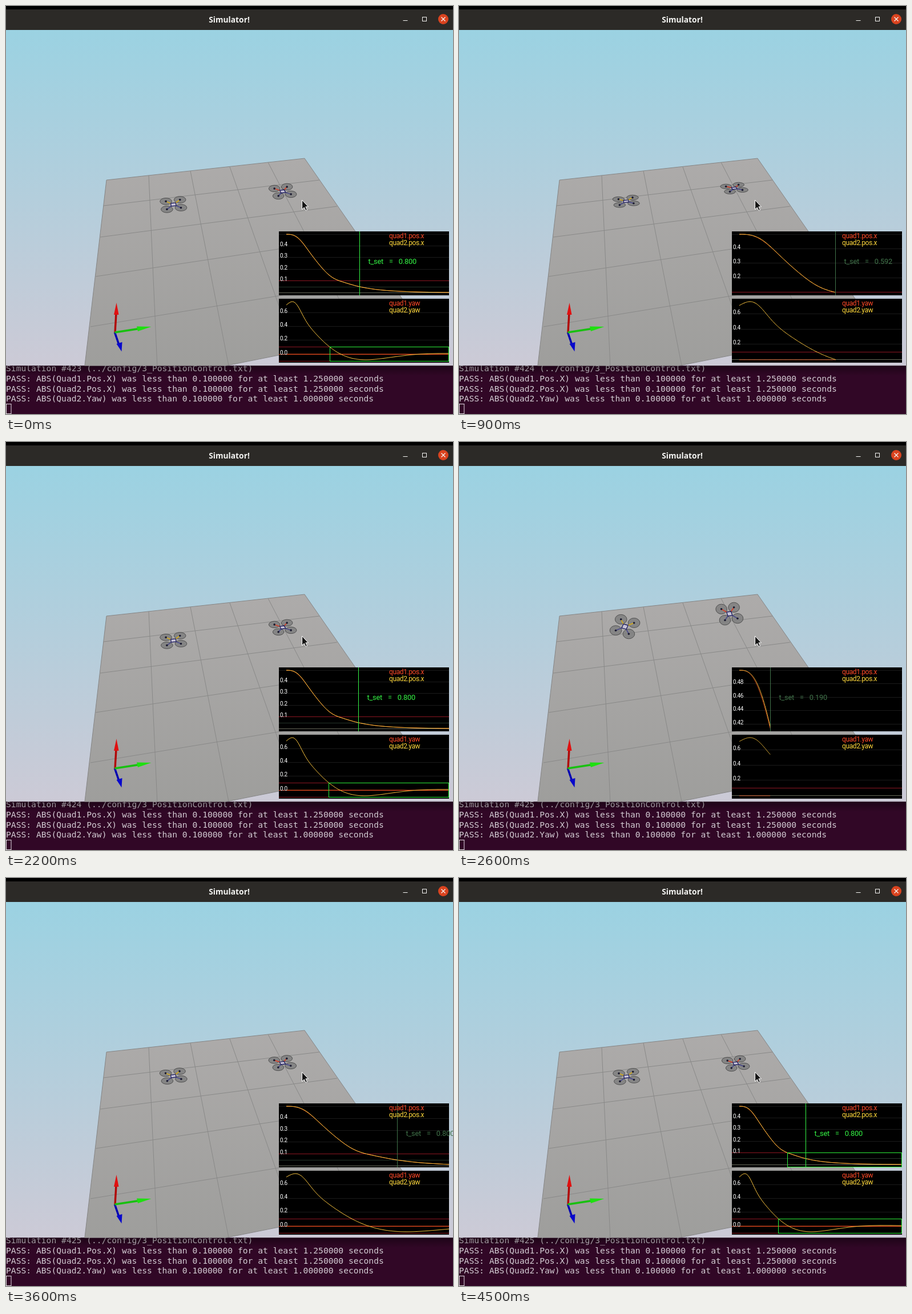
These frames come from a looping animation (783 px wide and 715 px high, 4600 ms). An HTML page:

```html
<!DOCTYPE html>
<html lang="en">
<head>
<meta charset="utf-8">
<title>Simulator</title>
<style>
  html, body { margin: 0; width: 100%; height: 100%; overflow: hidden; background: #000; }
  svg { display: block; }
  .title { font: bold 13.8px "Noto Sans", "Open Sans", sans-serif; fill: #f4f4f2; text-anchor: middle; }
  .term { font: 14.667px "DejaVu Sans Mono", monospace; fill: #d3ccd3; white-space: pre; }
  .plot { font-family: Roboto, "Liberation Sans", sans-serif; letter-spacing: -.4px; }
  .note { word-spacing: 7px; letter-spacing: -.2px; white-space: pre; }
  .crisp { shape-rendering: crispEdges; }
</style>
</head>
<body>
<svg width="783" height="715" viewBox="0 0 783 715">
  <defs>
    <linearGradient id="sky" x1="0" y1="0" x2="0" y2="1">
      <stop offset="0" stop-color="#9bd2e2"/><stop offset="1" stop-color="#cccad6"/>
    </linearGradient>
    <linearGradient id="floor" x1="0" y1="0" x2="0" y2="1">
      <stop offset="0" stop-color="#adabaa"/><stop offset="1" stop-color="#9c9c9a"/>
    </linearGradient>
    <linearGradient id="shade" x1="0" y1="0" x2="0" y2="1">
      <stop offset="0" stop-color="#000" stop-opacity=".4"/><stop offset="1" stop-color="#000" stop-opacity="0"/>
    </linearGradient>
    <clipPath id="view"><rect y="42" width="783" height="588.5"/></clipPath>
    <clipPath id="clipPos"><rect x="478" y="395" width="299" height="112"/></clipPath>
    <clipPath id="clipYaw"><rect x="478" y="513" width="299" height="112"/></clipPath>
  </defs>

  <rect width="783" height="715" fill="#000"/>
  <rect y="6" width="783" height="36" fill="#2c2a27"/>
  <text class="title" x="391" y="29">Simulator!</text>
  <g fill="none" stroke="#f4f4f2">
    <path d="M695.5 25.5h8"/>
    <rect x="729.5" y="19.5" width="7" height="7"/>
    <circle cx="766" cy="23" r="9" fill="#d9431f" stroke="none"/>
    <path d="M762.5 19.5l7 7m0-7l-7 7" stroke-width="1.3"/>
  </g>

  <rect y="630" width="783" height="85" fill="#310726"/>
  <g class="term">
    <text id="run" x="0" y="640"></text>
    <text x="0" y="658">PASS: ABS(Quad1.Pos.X) was less than 0.100000 for at least 1.250000 seconds</text>
    <text x="0" y="676">PASS: ABS(Quad2.Pos.X) was less than 0.100000 for at least 1.250000 seconds</text>
    <text x="0" y="693">PASS: ABS(Quad2.Yaw) was less than 0.100000 for at least 1.000000 seconds</text>
  </g>
  <rect x=".5" y="697.5" width="8.5" height="17" fill="none" stroke="#e6e0e6"/>
  <rect y="630" width="783" height="18" fill="url(#shade)"/>

  <g clip-path="url(#view)">
    <rect y="42" width="783" height="588.5" fill="url(#sky)"/>
    <path d="M176 305L523 267L728 562L132 681Z" fill="url(#floor)" stroke="#858585"/>
    <path d="M171 350L549 305M165 405L580 351M157 474L617 405M148 562L666 477
             M250 297L266 656M323 289L390 630M392 282L507 607M459 274L620 584" fill="none" stroke="#898988"/>
    <path d="M191 572L193 538" stroke="#b00808" stroke-width="3.500"/>
    <path d="M189 541L193.500 520L197.500 541Z" fill="#e01010"/>
    <path d="M190.500 572L198 594" stroke="#0000b0" stroke-width="3.500"/>
    <path d="M193.500 592L203.500 589L202.500 605.500Z" fill="#0808cc"/>
    <path d="M190.500 572L233 565.500" stroke="#18c010" stroke-width="3.500"/>
    <path d="M229 561.500L254.500 562L231 570Z" fill="#1ee010"/>
    <g id="drones"></g>
    <path d="M518.500 340V356.500L522.300 353L525 358.500L527.500 357.500L525 351.800H529.500Z" fill="#151515" stroke="#fff"/>
  </g>
  <g id="plots" class="plot"></g>
</svg>

<script>
const LOOP = 4600, STEP = 100;
const $ = id => document.getElementById(id);

// Each run starts its own clock; rate is in simulated seconds per ms
const RUNS = [
  { id: 423, from: 0, start: -1874, rate: .00095, slowing: 0 },
  { id: 424, from: 300, start: 266.5, rate: .000935, slowing: 0 },
  { id: 425, from: 2400, start: 2419, rate: .00106, slowing: 5.6e-8 }
];
const runAt = ms => RUNS.filter(run => run.from <= ms).pop() || RUNS[0];

function simTime({ start, rate, slowing }, ms) {
  const u = Math.max(0, ms - start);
  return u * (rate - slowing * u);
}

const bell = (t, middle, width) => Math.exp(-(((t - middle) / width) ** 2));

// Slow start, then exponential approach to zero
function pos1(t) {
  t = Math.max(0, t);
  return .5 * Math.exp(-3.2 * t ** 3 / (t * t + .08) - .12 * bell(t, .52, .12));
}
const pos2 = t => pos1(t) + .004 * bell(t, .15, .07);

// Damped swing with an early bump
const yaw2 = t => .76 * Math.exp(-2.37 * t) * Math.sin(3.6 * (.595 - t)) + .15 * bell(t, .09, .1);

// A quadrotor leans in proportion to its acceleration
function lean(t) {
  const h = .03, mid = t - h;
  return Math.atan((2 * pos1(mid) - pos1(mid - h) - pos1(mid + h)) / (h * h) / 10.5);
}

const line = (x1, y1, x2, y2, color, width = 1) =>
  `<path d="M${x1} ${y1}L${x2} ${y2}" stroke="${color}" stroke-width="${width}"/>`;
const label = (x, y, size, color, text) =>
  `<text x="${x}" y="${y}" font-size="${size}" fill="${color}">${text}</text>`;
const snap = v => Math.floor(v) + .5;

const LEFT = { start: [290, 318.5], end: [293.3, 348], ex: [1, 7], ey: [12.3, -1.5], radius: 10.3, lift: 8.8, arm: "#dcb010" };
const RIGHT = { start: [471.5, 296], end: [484.7, 325], ex: [3.5, 6.5], ey: [11, -1.5], radius: 9.8, lift: 9, arm: "#de3a20" };

function drone({ start, end, ex, ey, radius, lift, arm }, t, yaw) {
  const far = pos1(t) / .5, tilt = lean(t);
  const [cx, cy] = end.map((v, i) => v + (start[i] - v) * far);
  const fx = ex[0] * Math.cos(tilt), fy = ex[1] * Math.cos(tilt) + lift * Math.sin(tilt);
  const corners = r => [0, 1, 2, 3].map(k => {
    const angle = Math.PI / 4 - yaw * .85 + k * Math.PI / 2;
    const c = Math.cos(angle) * r, s = Math.sin(angle) * r;
    return [cx + fx * c + ey[0] * s, cy + fy * c + ey[1] * s];
  });
  const rotors = corners(Math.SQRT2), ry = radius * fy / ey[0];
  const discs = rotors.map(([x, y]) =>
    `<ellipse cx="${x}" cy="${y}" rx="${radius}" ry="${ry}" fill="#7f7f7f" fill-opacity=".85" stroke="#484848" stroke-width=".9"/>`);
  const arms = rotors.map(([x, y], k) => line(cx, cy, x, y, k == 1 || k == 2 ? arm : "#46468c", 1.5));
  const hubs = rotors.map(([x, y]) => `<circle cx="${x}" cy="${y}" r="1.8" fill="#1c1c30"/>`);
  return discs.join("") + arms.join("") + hubs.join("") +
    `<path d="M${corners(.5).join("L")}Z" fill="#c6c2d6" stroke="#1c1c5c" stroke-width="1.3"/>`;
}

const X0 = 491, X1 = 776, PANEL_H = 112;

// Smallest 1-2-5 step that gives at most eight ticks
function tickStep(range) {
  const unit = 10 ** Math.floor(Math.log10(range / 8));
  return unit * [1, 2, 5, 10].find(k => range / (k * unit) <= 8);
}

function plot({ top, clip, name, t, lo, hi, curves, band, hold, settle }) {
  const bottom = top + PANEL_H, span = Math.max(hi - lo, .002) * 1.1;
  const scale = PANEL_H / span, base = hi + span / 22;
  const px = s => X0 + s * (X1 - X0) / Math.max(1, t);
  const py = v => top + (base - v) * scale;
  const across = (v, color) => line(478, snap(py(v)), X1, snap(py(v)), color);
  let rules = `<rect x="478" y="${top}" width="298" height="${PANEL_H}" fill="#000"/>`;

  const step = tickStep(span), digits = Math.max(1, Math.ceil(-Math.log10(step) - 1e-6));
  let text = "";
  for (let k = Math.ceil((base - span) / step); k * step <= base; k++) {
    const y = py(k * step);
    rules += across(k * step, "#1b1b1b");
    if (y > top + 9 && y < bottom - 7) text += label(480, y + .5, 10, "#fff", Math.abs(k * step).toFixed(digits));
  }
  if (settle) rules += across(.05, "#26362a");
  rules += across(0, settle || lo === 0 ? "#666858" : "#d23c1e") + across(.1, "#8c1622") + across(-.1, "#8c1622");

  const traces = curves.map((f, i) => {
    const points = Array.from({ length: 151 }, (_, k) => t * k / 150).map(s => px(s).toFixed(2) + " " + py(f(s)).toFixed(2));
    return `<path d="M${points.join("L")}" fill="none" stroke="${i ? "#ffc840" : "#ff5a20"}" stroke-width="${i ? 1 : .8}"/>`;
  });

  let marks = "", note = "";
  if (t - band >= hold) {
    const x = snap(px(band)), y = snap(py(.1)), end = Math.min(snap(py(-.1)), bottom - .5);
    marks += `<path d="M${x} ${y}H${X1 - .5}V${end}H${x}Z" fill="none" stroke="#2df03a"/>`;
  }
  if (settle) {
    const time = Math.min(t, settle), x = snap(px(time)), color = t > 1.3 ? "#35f545" : "#41734a";
    marks += line(x, top, x, bottom, color);
    note = label(x + 15, top + 57, 12.8, color, "t_set = " + time.toFixed(3));
  }
  text += label(671, top + 12, 12, "#ff4a28", "quad1." + name) + label(671, top + 24, 12, "#ffd83c", "quad2." + name);
  return `<g clip-path="url(#${clip})"><g class="crisp">${rules}</g>${traces.join("")}<g class="crisp">${marks}</g>${text}</g>
    <g class="note">${note}</g>`;
}

function draw(ms) {
  const t = simTime(runAt(ms), ms);
  // The terminal prints one step after a restart
  $("run").textContent = `Simulation #${runAt(ms - STEP).id} (../config/3_PositionControl.txt)`;
  $("drones").innerHTML = drone(LEFT, t, yaw2(t)) + drone(RIGHT, t, 0);

  let low = 0, high = .7;
  for (let s = 0; s <= t; s += .005) {
    low = Math.min(low, yaw2(s));
    high = Math.max(high, yaw2(s));
  }
  $("plots").innerHTML =
    plot({ top: 395, clip: "clipPos", name: "pos.x", t, lo: pos1(t), hi: .5, curves: [pos1, pos2], band: .579, hold: 1.25, settle: .8 }) +
    plot({ top: 513, clip: "clipYaw", name: "yaw", t, lo: low, hi: high, curves: [() => 0, yaw2], band: .475, hold: 1 });
}

const began = performance.now();
let current = -1;
function tick() {
  const ms = Math.floor(((performance.now() - began) % LOOP) / STEP) * STEP;
  if (ms !== current) draw(current = ms);
  requestAnimationFrame(tick);
}
tick();
</script>
</body>
</html>
```
